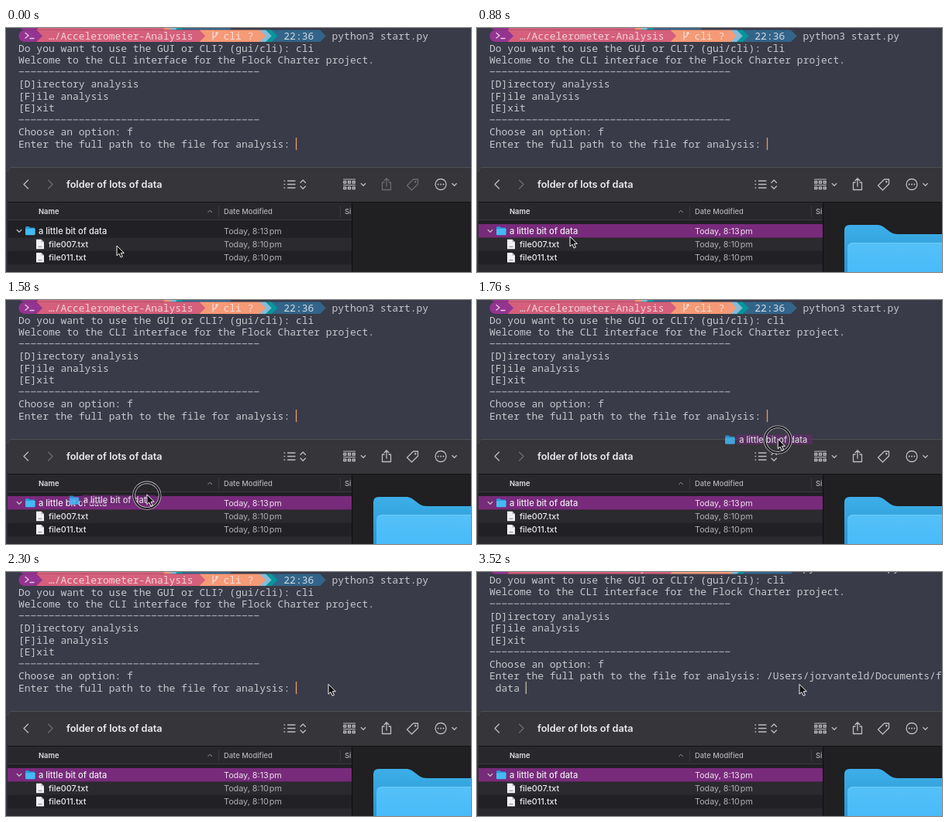
An HTML page for the animation above (3.56 s loop, 600 by 316 pixels).

```html
<!DOCTYPE html>
<html lang="en">
<head>
<meta charset="utf-8">
<title>Drag a folder into the terminal</title>
<style>
  html, body { margin: 0; width: 100%; height: 100%; overflow: hidden; background: #3a3b48; }
  svg { display: block; width: 600px; height: 316px; }
  text { white-space: pre; }
  .term { font: 12.97px "Noto Sans Mono", monospace; fill: #c6c8ce; }
  .ui { font: 500 11.1px Inter, sans-serif; fill: #ececef; }
  .ui .file { font-size: 10.75px; }
  .ui .dim { font-size: 10.8px; font-weight: 400; fill: #b0afb4; }
  .ui .head { font-size: 9.4px; fill: #b3b2b7; }
  .ui .title { font-size: 12.7px; font-weight: 600; }
  .line { fill: none; stroke: #bdbcc1; stroke-width: 1.3; stroke-linecap: round; stroke-linejoin: round; }
  .selected .dim.first { fill: #ebdfec; }
</style>
</head>
<body>
<svg viewBox="0 0 600 316">
  <defs>
    <linearGradient id="front" x2="0" y2="1">
      <stop stop-color="#55c0f8"/><stop offset="1" stop-color="#46bbf9"/>
    </linearGradient>
    <linearGradient id="back" x2="0" y2=".4">
      <stop stop-color="#3dafe8"/><stop offset="1" stop-color="#2c96d2"/>
    </linearGradient>
    <g id="folder">
      <path d="M0 1.500Q0 0 1.500 0H4.500L6 1.500H11Q12.500 1.500 12.500 3V9.500Q12.500 11 11 11H1.500Q0 11 0 9.500Z" fill="#2a98d6"/>
      <rect y="3" width="12.500" height="8.300" rx="1.200" fill="#45b9f4"/>
    </g>
    <g id="file">
      <path d="M0 0H6.500L10 3.500V12.500H0Z" fill="#f1f1f3"/>
      <path d="M6.500 0V3.500H10Z" fill="#b9b9bf"/>
      <path d="M2.500 9.500H7.500" stroke="#85858c"/>
    </g>
    <path id="down" class="line" d="M-2.700 -1.300L0 1.400L2.700 -1.300"/>
  </defs>

  <rect width="600" height="316" fill="#3a3b48"/>
  <g id="terminal" class="term">
    <g id="prompt"></g>
    <g id="lines"></g>
  </g>
  <rect id="caret" width="1.300" height="16" y="142"/>

  <g class="ui" id="finder">
    <path d="M1.500 316V185Q1.500 180 6.500 180H600V316Z" fill="#212024"/>
    <path d="M1.500 226V185Q1.500 180 6.500 180H600V226Z" fill="#363539"/>
    <path d="M2 186Q2 180.500 7 180.500H600" fill="none" stroke="#504f54"/>
    <path d="M2 225.500H600" stroke="#141316"/>
    <rect x="2" y="226" width="445" height="22" fill="#28272b"/>
    <path d="M2 248.500H447M274.500 230V245M431.500 230V245" stroke="#3a393e"/>
    <path d="M2 271.500H447V288.800H2ZM2 306.100H447V316H2Z" fill="#2b2a2e"/>
    <rect id="highlight" x="2" y="254" width="444" height="17.500" fill="#782a7b"/>

    <text class="title" x="78" y="206.600">folder of lots of data</text>
    <text class="head" x="42" y="240.600" style="font-weight:600;fill:#e0dfe3">Name</text>
    <text class="head" x="281" y="240.600">Date Modified</text>
    <text class="head" x="437" y="240.600">Size</text>
    <path d="M260.300 239L263.200 236.200L266 239" fill="none" stroke="#929196"/>

    <path class="line" d="M14.200 261.500L17 264.400L19.800 261.500"/>
    <use href="#folder" x="25" y="257"/>
    <use href="#file" x="39" y="273.800"/>
    <use href="#file" x="39" y="291.100"/>
    <text x="42" y="266.800">a little bit of data</text>
    <text class="file" x="55" y="284.100">file007.txt</text>
    <text class="file" x="55" y="301.400">file011.txt</text>
    <text class="dim first" x="281" y="266.800">Today, 8:13&#8202;pm</text>
    <text class="dim" x="281" y="284.100">Today, 8:10&#8202;pm</text>
    <text class="dim" x="281" y="301.400">Today, 8:10&#8202;pm</text>

    <rect x="446" y="226" width="154" height="90" fill="#201f22"/>
    <path d="M446.500 226V316" stroke="#0f0e11"/>
    <g id="preview">
      <path d="M474 400V262Q474 255 481 255H515C521 255 524 257 527 259.500L533 264Q537 267 543 267H600V400Z" fill="url(#back)"/>
      <path d="M478 320V285Q478 278 485 278H600V320Z" fill="url(#front)"/>
      <path d="M479 282Q481 278.500 485 278.500H600" fill="none" stroke="#6fcbfa"/>
    </g>

    <g class="line">
      <path d="M28.500 197L23 202.500L28.500 208"/>
      <path d="M54.500 197L60 202.500L54.500 208" opacity=".4"/>
      <path d="M363.500 198H373M363.500 202.500H373M363.500 207H373M359 198H359.600M359 202.500H359.600M359 207H359.600"/>
      <path d="M380 200.300L383.200 197L386.400 200.300M380 205L383.200 208.300L386.400 205"/>
      <path d="M435.500 196H450.500M435.500 203.500H450.500" stroke-width="1"/>
      <path d="M435.800 198.500h3v2.500h-3zM441.500 198.500h3v2.500h-3zM447.200 198.500h3v2.500h-3zM435.800 206h3v2.500h-3zM441.500 206h3v2.500h-3zM447.200 206h3v2.500h-3z"/>
      <g id="actions">
        <path d="M488 200H485.500V209.500H496.500V200H494M491 205V195M488 197.700L491 194.700L494 197.700"/>
        <path d="M517.500 204L525.500 196H531.500V202L523.500 210Z"/>
        <circle cx="528.300" cy="199.200" r=".6"/>
      </g>
      <circle cx="561" cy="202.500" r="7"/>
      <path d="M557.600 202.500h.1M561 202.500h.1M564.400 202.500h.1" stroke-width="1.800"/>
    </g>
    <use href="#down" x="461" y="202.800"/>
    <use href="#down" x="578.500" y="202.800"/>
  </g>

  <g id="ghost" class="ui" opacity=".85">
    <rect x="-4" y="-6.500" width="99" height="13" rx="4" fill="#6a2a70" opacity=".75"/>
    <use href="#folder" x="-18" y="-5.500"/>
    <text y="3.800">a little bit of data</text>
  </g>
  <g id="pointer">
    <g id="ring" fill="none">
      <circle cy="1.300" r="16.800" stroke="#b9b8bd" stroke-width="3.600"/>
      <circle cy="1.300" r="16.800" stroke="#1b1a1e" stroke-width="1.900"/>
    </g>
    <path d="M0 0V12.800L2.900 10.200L5.100 15L7.400 14L5.300 9.400H9.300Z" fill="#111" stroke="#f4f4f4"/>
  </g>
</svg>
<script>
const LOOP = 3560, CELL = 7.78, LEFT = 16, LINE = 15.55;
const SELECT = 560, PREVIEW = 650, GRAB = 1380, DRAG = 1460, DROP = 2090, PASTE = 2420;
const $ = id => document.getElementById(id);
const column = n => LEFT + n * CELL;

function add(parent, tag, attributes, content = '') {
  const node = document.createElementNS('http://www.w3.org/2000/svg', tag);
  for (const key in attributes) node.setAttribute(key, attributes[key]);
  node.textContent = content;
  return parent.appendChild(node);
}

// Powerline bar: the path ends at one column, the branch at another, the clock follows
function addBar(bottom, pathEnd, branchEnd) {
  const top = bottom - LINE, middle = bottom - LINE / 2, radius = LINE / 2;
  const bar = (fill, from, to) => add($('prompt'), 'path', {
    fill, d: `M${column(from)} ${top}H${column(to)}L${column(to + 1)} ${middle}L${column(to)} ${bottom}H${column(from)}Z`
  });
  bar('#33658a', branchEnd + 2, branchEnd + 10);
  bar('#06969a', branchEnd + 1, branchEnd + 2);
  bar('#86bbd8', branchEnd, branchEnd + 1);
  bar('#f59a76', pathEnd, branchEnd);
  bar('#d65f7b', 3, pathEnd);
  bar('#943490', 1, 3);
  add($('prompt'), 'path', { fill: '#943490', d: `M${column(1) + .3} ${top}A${radius} ${radius} 0 0 0 ${column(1) + .3} ${bottom}Z` });
}
addBar(18 - LINE, 24, 25);
addBar(18, 30, 40);

add($('prompt'), 'path', { class: 'line', style: 'stroke:#e6cfe4', d: 'M25 6.500L29 9.800L25 13M31 13.500H36' });
add($('prompt'), 'path', { class: 'line', style: 'stroke:#f0dcd4', d: 'M267 5V15M267 12Q272 11.500 272 6M270.500 7L272 5.500L273.500 7' });
[[5, '…/Accelerometer-Analysis', '#f1d3da'], [34, 'cli ?', '#f5ddd2'], [44, '22:36', '#d2dce6'], [52, 'python3 start.py', '#c6c8ce']]
  .forEach(([n, label, fill]) => add($('prompt'), 'text', { x: column(n), y: 14.5, fill }, label));

const question = 'Enter the full path to the file for analysis: ';
const rows = [
  'Do you want to use the GUI or CLI? (gui/cli): cli',
  'Welcome to the CLI interface for the Flock Charter project.',
  '', '[D]irectory analysis', '[F]ile analysis', '[E]xit', '',
  'Choose an option: f', question, ' data '
].map((line, i) => {
  const y = 30.5 + i * LINE;
  if (!line) add($('lines'), 'path', {
    d: `M${LEFT + .7} ${y - 4.9}H${column(40)}`, stroke: '#b9bbc2', 'stroke-dasharray': `6.3 ${CELL - 6.3}`
  });
  return add($('lines'), 'text', { x: LEFT, y }, line);
});

// Waypoints: time, x, y
const pointerPath = [[0, 143, 282], [180, 141, 281], [540, 120, 270], [1000, 120, 270], [1320, 92, 262],
  [1440, 92, 262], [1580, 181, 252], [1760, 388, 180], [2000, 416, 145.3], [LOOP, 416, 145.3]];
const ghostPath = [[1440, 42, 263], [1580, 99, 259], [1760, 338, 181], [2010, 366, 147], [LOOP, 366, 147]];

// Monotone cubic through the waypoints
function follow(path, t, axis) {
  const slope = i => path[i + 1] && path[i] ? (path[i + 1][axis] - path[i][axis]) / (path[i + 1][0] - path[i][0]) : 0;
  const tangent = i => {
    const a = slope(i - 1), b = slope(i);
    return a * b > 0 ? 2 * a * b / (a + b) : 0;
  };
  const i = Math.max(0, path.findIndex(point => point[0] > t) - 1);
  const span = path[i + 1][0] - path[i][0], u = Math.max(0, (t - path[i][0]) / span), v = 1 - u;
  return v * v * (1 + 2 * u) * path[i][axis] + u * u * (3 - 2 * u) * path[i + 1][axis]
    + span * u * v * (v * tangent(i) - u * tangent(i + 1));
}

const show = (node, visible) => node.setAttribute('visibility', visible ? 'visible' : 'hidden');
const move = (node, path, t) =>
  node.setAttribute('transform', `translate(${follow(path, t, 1)} ${follow(path, t, 2)})`);

function draw(t) {
  const selected = t >= SELECT, pasted = t >= PASTE;
  $('finder').classList.toggle('selected', selected);
  show($('highlight'), selected);
  show($('preview'), t >= PREVIEW);
  $('actions').setAttribute('opacity', selected ? 1 : 0.4);

  $('terminal').setAttribute('transform', `translate(0 ${pasted ? -LINE : 0})`);
  rows[8].textContent = question + (pasted ? '/Users/jorvanteld/Documents/fo' : '');
  show(rows[9], pasted);
  $('caret').setAttribute('x', column(pasted ? 6 : 46));
  $('caret').setAttribute('fill', pasted ? '#bdb5a6' : '#d9a06a');

  move($('pointer'), pointerPath, t);
  move($('ghost'), ghostPath, t);
  show($('ghost'), t >= DRAG && t < DROP);
  show($('ring'), t >= SELECT - 20 && t < SELECT + 90 || t >= GRAB && t < DROP);
}

const start = performance.now();
function tick() {
  draw((performance.now() - start) % LOOP);
  requestAnimationFrame(tick);
}
tick();
</script>
</body>
</html>
```
